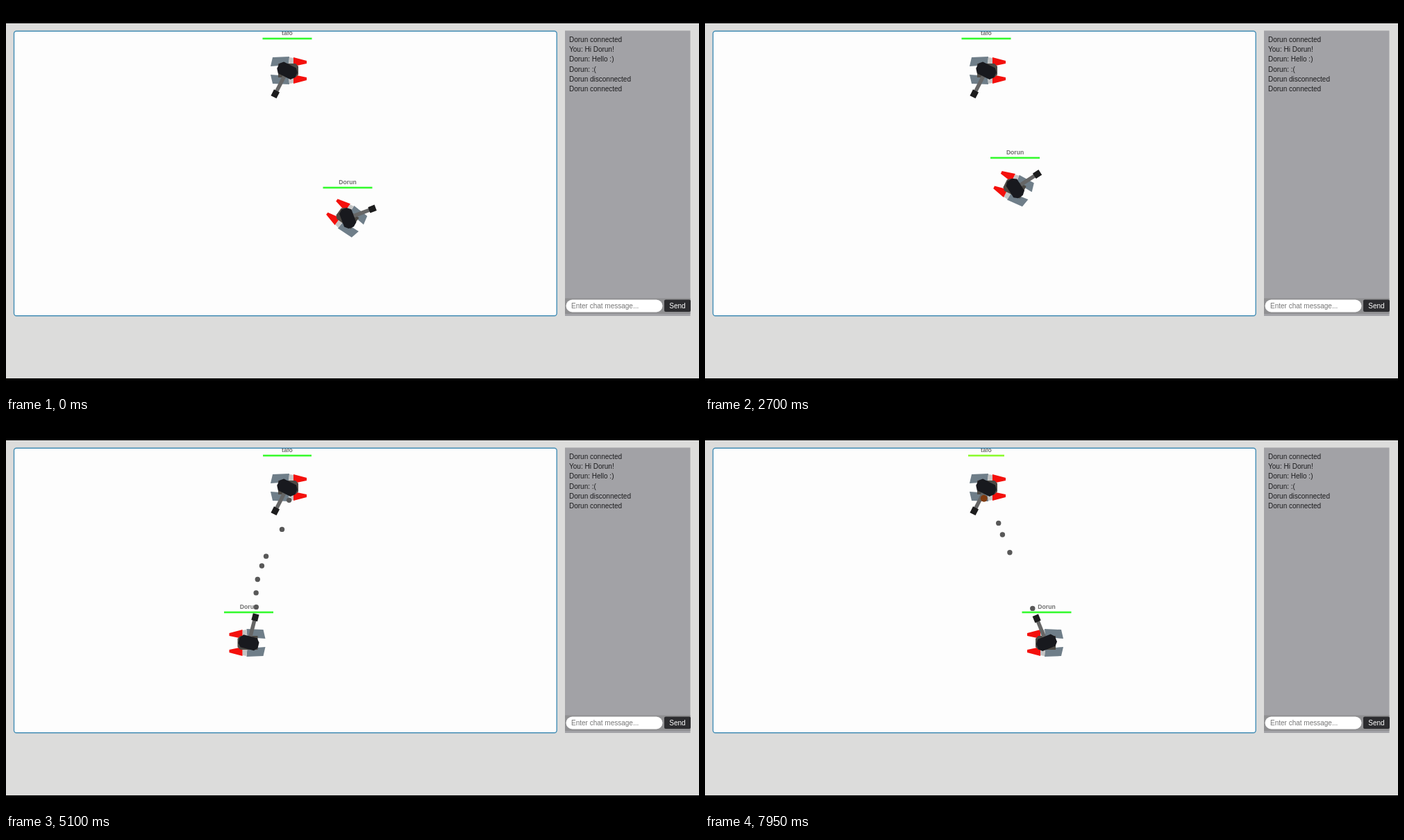
Write an HTML page that moves like this. It is 998x561 px and loops after 8000 ms.

```html
<!DOCTYPE html>
<html lang="en">
<head>
<meta charset="utf-8">
<title>Tank arena</title>
<style>
  html, body { margin: 0; width: 100%; height: 100%; overflow: hidden; background: #000; }
  svg { display: block; width: 998px; height: 561px; font-family: "Liberation Sans", Arial, sans-serif; font-size: 10px; }
  .label { font-weight: bold; font-size: 8.6px; fill: #707070; text-anchor: middle; }
</style>
</head>
<body>
<svg viewBox="0 0 998 561">
  <defs>
    <clipPath id="field"><rect x="12" y="36.5" width="781" height="410" rx="3"/></clipPath>
    <g id="pod">
      <path d="M-21-19 3-20 2-8-24-6z" fill="#6f7e89"/>
      <path d="M3-19 9-18 9-7 2-7z" fill="#c4c4c4"/>
      <path d="M9-19 28-14 28-10 9-6z" fill="#f4100c"/>
    </g>
    <g id="hull">
      <use href="#pod"/>
      <use href="#pod" transform="scale(1 -1)"/>
      <path d="M-13-10H12L16-6V6L12 10H-13z" fill="#4c4944"/>
    </g>
    <g id="turret">
      <path d="M0 0H34" stroke="#666" stroke-width="5.5"/>
      <path d="M33-4.5H43V4.5H33z" fill="#1c1c1d"/>
      <path d="M-9-10-4-14.5H4L9.5-10V10L4 14.5H-4L-9 10z" fill="#18191e"/>
    </g>
  </defs>
  <rect y="25" width="998" height="512" fill="#dcdcdb"/>
  <rect x="11.5" y="36.2" width="781.7" height="410.6" rx="3.5" fill="#fdfdfd" stroke="#438db5" stroke-width="1.4"/>
  <g id="arena" clip-path="url(#field)"></g>
  <rect x="805" y="35.5" width="180.5" height="411.5" fill="#a2a2a6"/>
  <rect x="805" y="421.5" width="180.5" height="22.5" fill="#909092"/>
  <g id="chat" fill="#1c1c1e"></g>
  <rect x="806.5" y="423.5" width="139" height="18" rx="9" fill="#fff"/>
  <text x="814" y="436" fill="#777">Enter chat message...</text>
  <rect x="948" y="423.5" width="38" height="17.5" rx="2" fill="#2c2c2f"/>
  <text x="967" y="436" fill="#fff" text-anchor="middle">Send</text>
</svg>
<script>
const SVG = 'http://www.w3.org/2000/svg';
const LOOP = 8000, STEP = 50;
const MUZZLE = 46, BULLET_SPEED = 7.57, HIT_RADIUS = 16, BURST_TICKS = 3;
const BAR = 71, DAMAGE = 1.12;
const RIVAL = 'Dorun', OWN = 'tafo';
const home = { x: 405, y: 93 };

// Motion tables: [tick, value]
const timing = [[0, 0], [5800, 116], [6350, 126.6], [6700, 132], [8000, 158]];
const tankX = [[24, 492], [25, 488.5], [42.2, 488.5], [90, 318.5], [93.3, 318.5], [142, 492]];
const tankY = [[24, 306], [36, 263], [55, 263], [70, 317]];
const heading = [[24, 216], [36, 266], [43, 266], [57, 190], [67, 137], [70, 135], [80, 180]];
const aimX = [[42, 712], [67, 486], [75, 395], [85, 395], [90, 389], [106, 390], [113, 398],
              [116, 400], [122, 407], [127, 412], [130, 417], [134, 417], [139, 428]];
const aimY = [[8, 223], [9, 165], [42, 165], [67, 160]];
const shots = [9, 77, 80, 85, 90, 92, 95, 98, 101, 106, 109, 113, 116,
               119.5, 122, 127, 129.7, 134, 139, 141, 144.5, 156];

function at(keys, t) {
  if (t <= keys[0][0]) return keys[0][1];
  for (let i = 1; i < keys.length; i++) {
    const [t0, a] = keys[i - 1], [t1, b] = keys[i];
    if (t < t1) return a + (b - a) * (t - t0) / (t1 - t0);
  }
  return keys[keys.length - 1][1];
}

function pose(tick) {
  const x = at(tankX, tick), y = at(tankY, tick);
  return { x, y, aim: Math.atan2(at(aimY, tick) - y, at(aimX, tick) - x) };
}

function add(parent, tag, attrs, text) {
  const node = document.createElementNS(SVG, tag);
  set(node, attrs);
  if (text) node.textContent = text;
  return parent.appendChild(node);
}

function set(node, attrs) {
  for (const key in attrs) node.setAttribute(key, attrs[key]);
}

function makeTank(parent, name) {
  const g = add(parent, 'g', {});
  return {
    hull: add(g, 'use', { href: '#hull' }),
    turret: add(g, 'use', { href: '#turret' }),
    label: add(g, 'text', { class: 'label' }, name),
    bar: add(g, 'rect', { height: 2.6 })
  };
}

function placeTank(tank, x, y, angle, aim, barY, lost) {
  const move = `translate(${x} ${y}) rotate`;
  set(tank.hull, { transform: `${move}(${angle})` });
  set(tank.turret, { transform: `${move}(${aim})` });
  set(tank.label, { x, y: barY - 5 });
  set(tank.bar, {
    x: x - (BAR - lost) / 2, y: barY - 1.3, width: BAR - lost,
    fill: `rgb(${Math.round(51 + lost * 4.6)},250,45)`
  });
}

const arena = document.getElementById('arena');
const chat = document.getElementById('chat');
[`${RIVAL} connected`, `You: Hi ${RIVAL}!`, `${RIVAL}: Hello :)`, `${RIVAL}: :(`,
 `${RIVAL} disconnected`, `${RIVAL} connected`]
  .forEach((line, i) => add(chat, 'text', { x: 811, y: 52 + i * 14.2 }, line));

const own = makeTank(arena, OWN);
const rival = makeTank(arena, RIVAL);

// Each shot flies straight from the muzzle until it meets the circle around home.
const bullets = shots.map(fired => {
  const { x, y, aim } = pose(fired);
  const dx = Math.cos(aim), dy = Math.sin(aim);
  const rx = home.x - x, ry = home.y - y;
  const along = rx * dx + ry * dy, across = rx * dy - ry * dx;
  const reach = Math.abs(across) < HIT_RADIUS
    ? along - Math.sqrt(HIT_RADIUS ** 2 - across ** 2) : Infinity;
  return { fired, x, y, dx, dy, reach,
           hit: fired + (reach - MUZZLE) / BULLET_SPEED,
           dot: add(arena, 'circle', {}) };
});

function draw(time) {
  const tick = at(timing, Math.floor(time / STEP) * STEP);
  const { x, y, aim } = pose(tick);
  const hits = bullets.filter(b => b.hit <= tick).length;
  placeTank(own, home.x, home.y, 0, 117, 47, hits * DAMAGE);
  placeTank(rival, x, y, at(heading, tick), aim * 180 / Math.PI, y - 44, 0);

  for (const b of bullets) {
    const visible = tick >= b.fired && tick < b.hit + BURST_TICKS;
    const burst = tick >= b.hit;
    const d = Math.min(b.reach, MUZZLE + BULLET_SPEED * (tick - b.fired));
    set(b.dot, {
      cx: b.x + b.dx * d, cy: b.y + b.dy * d,
      r: burst ? 5 : 3.7, fill: burst ? '#803b10' : '#585858',
      visibility: visible ? 'visible' : 'hidden'
    });
  }
}

const start = performance.now();
function frame() {
  draw((performance.now() - start) % LOOP);
  requestAnimationFrame(frame);
}
frame();
</script>
</body>
</html>
```
